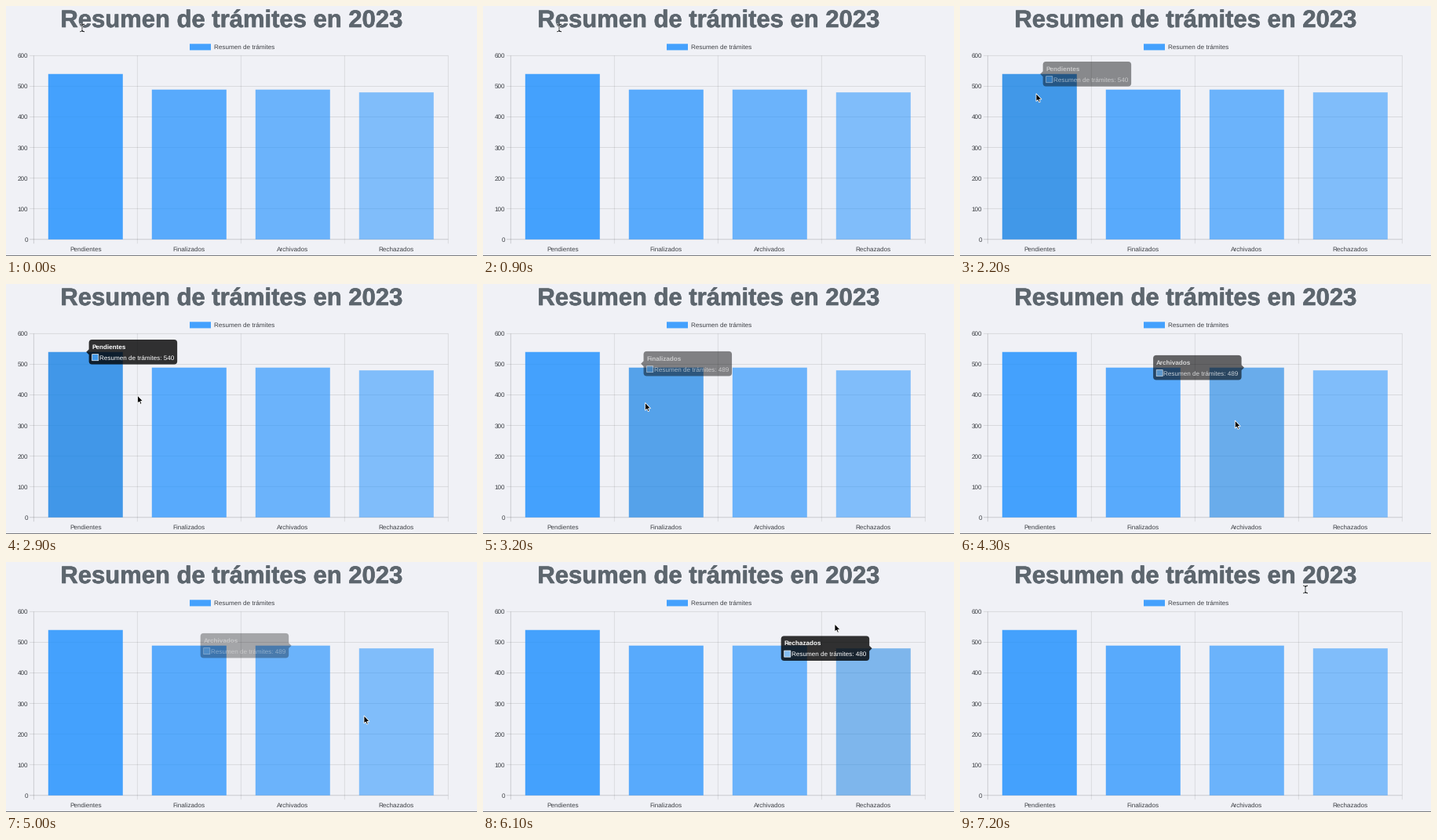
Recreate the animation shown at these times as a matplotlib script. Size 600 px wide and 319 px high, loop 7.4 s.

```python
import numpy as np
import matplotlib.pyplot as plt
from matplotlib.animation import FuncAnimation
from matplotlib.patches import PathPatch, Polygon, Rectangle
from matplotlib.path import Path
from matplotlib.patheffects import withStroke

W, H, DPI = 600, 319, 100
PT = 72 / DPI                 # points per pixel
STEP, FRAMES = 100, 74

plt.rcParams["font.family"] = "Liberation Sans"
plt.rcParams["text.hinting"] = "none"

BG, INK, TITLE = "#f0f1f6", "#3c3f44", "#5d666e"
BASE = np.array([30, 144, 255]) / 255
HOVER = np.array([26, 132, 229]) / 255
SERIES = "Resumen de trámites"
DATA = {"Pendientes": 540, "Finalizados": 489,
        "Archivados": 489, "Rechazados": 480}
LABELS, VALUES = list(DATA), list(DATA.values())

LEFT, TOP, BOTTOM = 35.3, 63.3, 297.8
SLOT, BAR_W = 132, 95
RIGHT = LEFT + 4 * SLOT
K = 0.675                     # chart units to pixels
FONT, PAD, CARET = 12 * K, 6 * K, 5 * K
TIP_W, TIP_H = 112.5, 46.8 * K
LAG = 100                     # delay of the chart behind the pointer

# Pointer moves: start, end, target x, target y, easing power
REST = (97, 28)
MOVES = [(1690, 2500, 97, 125, 2),
         (2700, 3180, 204, 151, 2),
         (3180, 4780, 413, 184, 1),
         (4780, 5000, 456, 196, 1),
         (5000, 6100, 448, 79, 0.5),
         (6100, 6400, 440, 35, 2)]


def ease(u, power=4):
    return 1 - (1 - np.clip(u, 0, 1)) ** power


def pointer(t):
    pos = np.array(REST, float)
    for start, end, x, y, power in MOVES:
        pos += (np.array([x, y]) - pos) * ease((t - start) / (end - start), power)
    return pos


def y_of(value):
    return BOTTOM - value * (BOTTOM - TOP) / 600


def center(i):
    return LEFT + SLOT * (i + 0.5)


def opacity(i):
    return 0.82 - 0.095 * i


def visit(i, path):
    """Times at which the chart sees the pointer enter and leave bar i."""
    x, y = path.T
    inside = (abs(x - center(i)) < BAR_W / 2) & (y > y_of(VALUES[i]))
    times = np.flatnonzero(inside)
    return times[0] + LAG, times[-1] + LAG


track = np.array([pointer(t) for t in range(STEP * FRAMES)])
VISITS = [visit(i, track) for i in range(4)]

fig = plt.figure(figsize=(W / DPI, H / DPI), dpi=DPI, facecolor=BG)
ax = fig.add_axes([0, 0, 1, 1])
ax.set_xlim(0, W)
ax.set_ylim(H, 0)
ax.axis("off")


def label(x, y, s, size=FONT, color=INK, **kw):
    """Text whose capitals are centred on y."""
    return ax.text(x, y + 0.355 * size, s, fontsize=size * PT, color=color,
                   va="baseline", **kw)


def rect(x, y, w, h, **kw):
    return ax.add_patch(Rectangle((x, y), w, h, **{"lw": 0, "snap": False, **kw}))


def line(xs, ys, alpha):
    ax.plot(xs, ys, color="black", alpha=alpha, lw=0.8 * PT, zorder=1,
            solid_capstyle="butt", snap=False)


# Static chart
label(287.3, 16, "Resumen de trámites en 2023", 31, TITLE, ha="center",
      weight="bold", path_effects=[withStroke(linewidth=0.6 * PT, foreground=TITLE)])
rect(234, 48.3, 27, 8.1, fc=(*BASE, opacity(0)))
label(264.7, 52.2, SERIES)
for v in range(0, 601, 100):
    line([LEFT - 8 * K, RIGHT], [y_of(v)] * 2, 0.12 if v else 0.2)
    label(28, y_of(v), str(v), ha="right")
for i in range(5):
    line([LEFT + SLOT * i] * 2, [TOP, BOTTOM + 8 * K], 0.11 if i else 0.18)
for i, name in enumerate(LABELS):
    label(center(i), 310, name, ha="center")
rect(0, 318, W, 1, fc="#7b7d82")

bars = [rect(center(i) - BAR_W / 2, y_of(v), BAR_W, BOTTOM - y_of(v), zorder=2)
        for i, v in enumerate(VALUES)]

# Tooltip
tip = ax.add_patch(PathPatch(Path([(0, 0), (1, 1)]), fc="black", lw=0, zorder=5))
swatch = rect(0, 0, FONT, FONT, ec="white", lw=0.7 * PT, zorder=6)
tip_title = label(0, 0, "", color="white", weight="bold", zorder=6)
tip_body = label(0, 0, "", color="white", zorder=6)
tip_parts = (swatch, tip_title, tip_body)

# Pointers
ARROW = np.array([(0, 0), (0, 10), (2.2, 8), (3.7, 11.3), (5.3, 10.6),
                  (3.9, 7.4), (7, 7.4)])
arrow = ax.add_patch(Polygon(ARROW, fc="black", ec="white", lw=0.8 * PT, zorder=9))
FORK = np.array([(-2.5, -4.8), (0, -3.8), (2.5, -4.8), (0, -3.8)])
BEAM = np.vstack([FORK, FORK[::-1] * (1, -1)])
beam, = ax.plot([], [], color="#2c2f33", lw=0.9 * PT, zorder=9,
                path_effects=[withStroke(linewidth=1.8 * PT, foreground="white")])


def tip_box(i):
    """Top left corner of the tooltip beside bar i."""
    gap = 7 * K
    x = center(i) + gap if i < 2 else center(i) - gap - TIP_W
    return np.array([x - 0.4, y_of(VALUES[i]) - TIP_H / 2])


def tip_path(x, y, caret_left):
    r, x2, y2, m = 6 * K, x + TIP_W, y + TIP_H, y + TIP_H / 2
    L, C = Path.LINETO, Path.CURVE3
    steps = [(Path.MOVETO, x + r, y), (L, x2 - r, y), (C, x2, y), (C, x2, y + r)]
    if not caret_left:
        steps += [(L, x2, m - CARET), (L, x2 + CARET, m), (L, x2, m + CARET)]
    steps += [(L, x2, y2 - r), (C, x2, y2), (C, x2 - r, y2),
              (L, x + r, y2), (C, x, y2), (C, x, y2 - r)]
    if caret_left:
        steps += [(L, x, m + CARET), (L, x - CARET, m), (L, x, m - CARET)]
    steps += [(L, x, y + r), (C, x, y), (C, x + r, y)]
    return Path([s[1:] for s in steps], [s[0] for s in steps])


def draw_bars(t):
    for i, (start, end) in enumerate(VISITS):
        h = ease((t - start) / 200) - ease((t - end) / 200)
        bars[i].set_facecolor((*(BASE + (HOVER - BASE) * h), opacity(i)))


def draw_tip(t):
    # The latest bar entered owns the tooltip
    i = sum(start < t for start, _ in VISITS) - 1
    start, end = VISITS[i]
    fade = 0.0
    if i >= 0:
        fade = np.clip((t - start) / 200, 0, 1) - np.clip((t - end) / 200, 0, 1)
    tip.set_alpha(0.8 * fade)
    for part in tip_parts:
        part.set_alpha(fade)
    if fade <= 0:
        return
    old = tip_box(max(i - 1, 0))
    x, y = old + (tip_box(i) - old) * ease((t - start) / 400)
    tip.set_path(tip_path(x, y, i < 2))
    drop = 0.355 * FONT
    a = opacity(i)
    swatch.set_xy((x + PAD, y + 18.7))
    swatch.set_facecolor(HOVER * a + 1 - a)
    tip_title.set_text(LABELS[i])
    tip_title.set_position((x + PAD, y + 8.9 + drop))
    tip_body.set_text(f"{SERIES}: {VALUES[i]}")
    tip_body.set_position((x + PAD + 9.3, y + 22.7 + drop))


def draw_pointer(t):
    pos = track[t]
    on_text = pos[1] < 40
    arrow.set_visible(not on_text)
    arrow.set_xy(ARROW + pos)
    beam.set_visible(on_text)
    beam.set_data(*(BEAM + pos).T)


def draw(frame):
    t = frame * STEP
    draw_bars(t)
    draw_tip(t)
    draw_pointer(t)
    return []


anim = FuncAnimation(fig, draw, frames=FRAMES, interval=STEP, repeat=True,
                     repeat_delay=0, blit=False)
plt.show()
```
